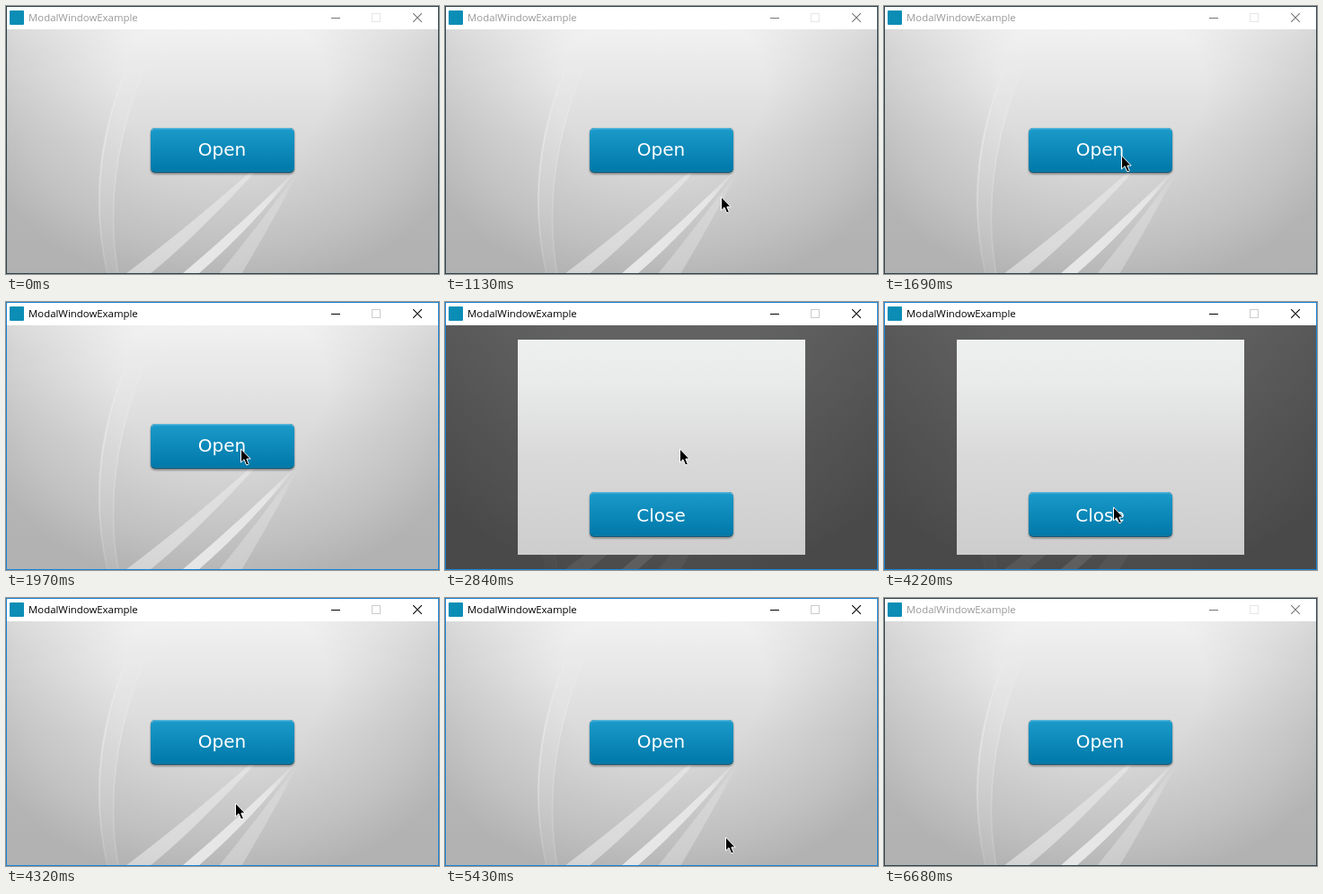
Write an HTML page that moves like this. It is 482 by 299 pixels and loops after 6.83 s.

```html
<!DOCTYPE html>
<html lang="en">
<head>
<meta charset="utf-8">
<title>Modal window</title>
<style>
  html, body { margin: 0; width: 100%; height: 100%; overflow: hidden; background: #fff; }
  svg { display: block; }
  .title { font: 11.4px "Open Sans", sans-serif; }
  .label { font: 20px "DejaVu Sans", sans-serif; fill: #fff; text-anchor: middle; }
  .icons { fill: none; stroke-width: 1; }
  #win { --ink: #000; --frame: #1883d7; --dim: #ccc; }
  #win.idle { --ink: #999; --frame: #2e444f; --dim: #e6e6e6; }
  #win.idle .icons { --ink: #757575; }
  .down { display: none; }
  .pressed .down { display: inline; }
  .pressed .up { display: none; }
</style>
</head>
<body>
<svg width="482" height="299" viewBox="0 0 482 299">
  <defs>
    <linearGradient id="sky" x2="0" y2="1">
      <stop offset="0" stop-color="#eeeeee"/>
      <stop offset=".12" stop-color="#eaeaea"/>
      <stop offset=".45" stop-color="#dadada"/>
      <stop offset="1" stop-color="#cfcfcf"/>
    </linearGradient>
    <radialGradient id="edge" gradientUnits="userSpaceOnUse" cx="241" cy="90" r="290"
      gradientTransform="translate(0 18) scale(1 .8)">
      <stop offset=".4" stop-color="#888" stop-opacity="0"/>
      <stop offset=".8" stop-color="#888" stop-opacity=".25"/>
      <stop offset="1" stop-color="#888" stop-opacity=".42"/>
    </radialGradient>
    <linearGradient id="fade" x2="0" y2="1">
      <stop offset="0" stop-color="#fff"/>
      <stop offset=".3" stop-color="#fff" stop-opacity=".35"/>
      <stop offset="1" stop-color="#fff" stop-opacity="0"/>
    </linearGradient>
    <linearGradient id="ray" gradientUnits="userSpaceOnUse" x1="325" y1="180" x2="220" y2="298">
      <stop offset="0" stop-color="#fff" stop-opacity="0"/>
      <stop offset=".3" stop-color="#fff" stop-opacity=".5"/>
      <stop offset="1" stop-color="#fff" stop-opacity=".65"/>
    </linearGradient>
    <linearGradient id="arc" gradientUnits="userSpaceOnUse" x1="0" y1="50" x2="0" y2="298">
      <stop offset="0" stop-color="#fff" stop-opacity="0"/>
      <stop offset=".4" stop-color="#fff" stop-opacity=".3"/>
      <stop offset="1" stop-color="#fff" stop-opacity=".15"/>
    </linearGradient>
    <linearGradient id="panel" x2="0" y2="1">
      <stop offset="0" stop-color="#eef0f0"/>
      <stop offset=".2" stop-color="#e9eaea"/>
      <stop offset=".55" stop-color="#d9d9d9"/>
      <stop offset="1" stop-color="#cdcdcd"/>
    </linearGradient>
    <linearGradient id="blue" x2="0" y2="1">
      <stop offset="0" stop-color="#1a9aca"/>
      <stop offset="1" stop-color="#0078a8"/>
    </linearGradient>
    <linearGradient id="deep" x2="0" y2="1">
      <stop offset="0" stop-color="#005f85"/>
      <stop offset="1" stop-color="#006e9a"/>
    </linearGradient>
    <filter id="soft"><feGaussianBlur stdDeviation="1"/></filter>
    <clipPath id="body"><rect x="1" y="26" width="480" height="272"/></clipPath>
    <clipPath id="round"><rect width="160" height="50" rx="5"/></clipPath>
    <g id="face">
      <g class="up">
        <rect y="1.5" width="160" height="50" rx="5" opacity=".45" filter="url(#soft)"/>
        <g clip-path="url(#round)">
          <rect width="160" height="50" fill="#00587d"/>
          <rect width="160" height="48.6" rx="5" fill="#55b6d9"/>
          <rect y="1.5" width="160" height="47.1" rx="5" fill="url(#blue)"/>
        </g>
      </g>
      <g class="down">
        <rect width="160" height="50" rx="5" fill="url(#deep)"/>
        <rect x=".5" y=".5" width="159" height="49" rx="4.5" fill="none" stroke="#004d6d" stroke-opacity=".7"/>
      </g>
    </g>
  </defs>

  <g id="win">
    <rect width="482" height="299" fill="#fff"/>
    <rect x="4" y="5" width="16" height="16" rx="1" fill="#0b8db5"/>
    <text class="title" x="25" y="17" fill="var(--ink)">ModalWindowExample</text>
    <g class="icons" stroke="var(--ink)">
      <path d="M362 13.5h10"/>
      <rect x="407.5" y="8.5" width="9" height="9" stroke="var(--dim)"/>
      <path d="M453.2 8.2l9.6 9.6m0-9.6l-9.6 9.6" stroke-width="1.1"/>
    </g>

    <g clip-path="url(#body)">
      <rect y="26" width="482" height="273" fill="url(#sky)"/>
      <rect y="26" width="482" height="273" fill="url(#edge)"/>
      <rect y="26" width="482" height="90" fill="url(#fade)" opacity=".2"/>
      <path d="M140 55Q82 180 114 299H125Q102 180 162 50Z" fill="url(#arc)" opacity=".5"/>
      <g fill="none" stroke="url(#arc)" stroke-width="1.6">
        <path d="M140 55Q86 180 113 299"/>
        <path d="M162 50Q104 180 125 299"/>
      </g>
      <g fill="url(#ray)">
        <path d="M326 180Q262 243 196 299H214Q275 246 326 180Z"/>
        <path d="M330 178Q285 240 237 299H262Q288 256 330 178Z" opacity=".45"/>
        <path d="M300 160Q215 237 133 299H160Q215 255 300 160Z" opacity=".65"/>
      </g>
      <g id="open" transform="translate(161 136)">
        <use href="#face"/>
        <text class="label" x="79.5" y="31">Open</text>
      </g>
      <g id="modal">
        <rect y="26" width="482" height="273" opacity=".59"/>
        <rect x="81" y="42" width="320" height="240" fill="url(#panel)"/>
        <g id="close" transform="translate(161 212)">
          <use href="#face"/>
          <text class="label" x="79.5" y="33">Close</text>
        </g>
      </g>
    </g>
    <rect x=".5" y=".5" width="481" height="298" fill="none" stroke="var(--frame)"/>
  </g>
  <path id="cursor" d="M.5 .9V16L4 12.7 6.5 18.5H8.6L9.1 17.4 6.9 12H11.2Z" stroke="#fff" stroke-width="1"/>
</svg>
<script>
  const LOOP = 6830, TICK = 46;
  const $ = id => document.getElementById(id);
  const linear = p => p;
  const out = p => p * (2 - p);
  const inOut = p => (1 - Math.cos(Math.PI * p)) / 2;

  // start, end, from, to, easing
  const moves = [
    [620, 1130, [387, 297], [307, 212], linear],
    [1130, 1260, [307, 212], [290, 196], linear],
    [1260, 1850, [290, 196], [261, 163], out],
    [2800, 3710, [261, 163], [255, 228], inOut],
    [4930, 5630, [255, 228], [347, 289], p => p ** 1.15],
    [5630, 5760, [347, 289], [364, 301], linear]
  ];

  function cursorAt(t) {
    const [start, end, a, b, ease] = moves.findLast(m => t >= m[0]) || moves[0];
    const held = t >= end ? end : start + Math.floor((t - start) / TICK) * TICK;
    const p = ease((held - start) / (end - start));
    return a.map((v, i) => Math.round(v + (b[i] - v) * p));
  }

  const within = (t, a, b) => t >= a && t < b;
  const show = (id, on) => $(id).setAttribute("visibility", on ? "visible" : "hidden");

  function render(t) {
    $("win").classList.toggle("idle", !within(t, 1870, 6680));
    $("open").classList.toggle("pressed", within(t, 1870, 2000));
    $("close").classList.toggle("pressed", within(t, 4190, 4320));
    show("modal", within(t, 2000, 4320));
    show("cursor", within(t, 620, 5760));
    $("cursor").setAttribute("transform", `translate(${cursorAt(t)})`);
  }

  const began = performance.now();
  function frame() {
    render((performance.now() - began) % LOOP);
    requestAnimationFrame(frame);
  }
  frame();
</script>
</body>
</html>
```
